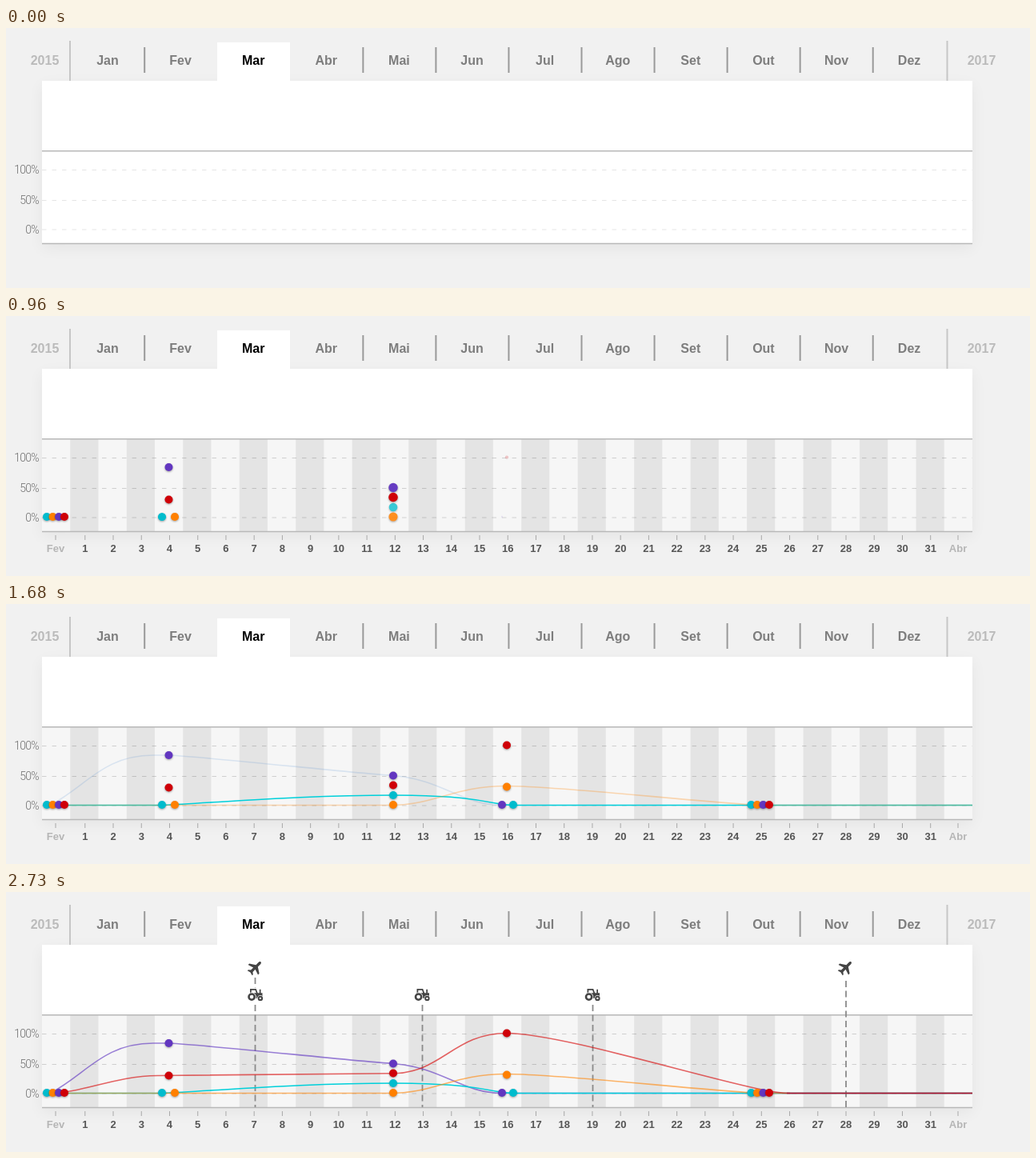
An HTML page that plays this animation: 1280x325 px, repeating every 2850 ms.

```html
<!DOCTYPE html>
<html lang="pt">
<head>
<meta charset="utf-8">
<title>Março</title>
<style>
@property --t { syntax: "<number>"; inherits: true; initial-value: 0; }
@keyframes clock { from { --t: 0; } to { --t: 2850; } }

html, body { margin: 0; width: 100%; height: 100%; overflow: hidden; background: #f1f1f1; }
body { position: relative; }
.shadow {
  position: absolute; left: 45px; top: 66px; width: 1163px; height: 203px;
  box-shadow: 0 6px 18px rgba(0, 0, 0, .055);
}
svg {
  position: absolute; left: 0; top: 0; width: 1280px; height: 325px;
  animation: clock 2850ms steps(95) infinite;
}
text { font: bold 16px "Liberation Sans", Arial, sans-serif; text-anchor: middle; fill: #7d7d7d; }
.pale { fill: #bbb; }
.now { fill: #000; }
.pct text { font: 300 14px Roboto, sans-serif; letter-spacing: -.7px; text-anchor: end; fill: #707070; }
.days text { font-size: 13px; fill: #555; }
.days text.pale { fill: #b5b5b5; }
.days line { stroke: #a8a8a8; }

/* --p runs 0..1 from --s over --d milliseconds */
.step { --p: clamp(0, (var(--t) - var(--s)) / var(--d), 1); }
.fade { opacity: var(--p); }
.intro { --s: 0; --d: 350; }
.guide { stroke: #000; stroke-dasharray: 5.5 7; stroke-opacity: calc(.1 + .06 * var(--p)); }

.dot {
  --d: 330;
  --q: (var(--p) - 1);
  opacity: clamp(0, (var(--t) - var(--s)) / 150, 1);
  transform: scale(calc(1 + 3.3 * var(--q) * var(--q) * var(--q) + 2.3 * var(--q) * var(--q)));
  transform-box: fill-box; transform-origin: center;
  filter: drop-shadow(0 1px 1px rgba(0, 0, 0, .35));
}
.curve { --d: 240; fill: none; stroke-width: 1.6; }
.tint { stroke: color-mix(in srgb, #5f36c2 calc(100% * var(--p)), #2b93cf); }
.icons { --s: 2040; --d: 360; fill: #444; opacity: calc(1 - (1 - var(--p)) * (1 - var(--p))); }
.wipe { --s: 2370; --d: 360; height: calc(165px * var(--p)); }
.drop { stroke: #8a8a8a; stroke-width: 1.8; stroke-dasharray: 8 4.5; }
</style>
</head>
<body>
<div class="shadow"></div>
<svg viewBox="0 0 1280 325">
  <defs>
    <clipPath id="wipe"><rect class="step wipe" y="104" width="1280"/></clipPath>
    <path id="plane" transform="rotate(45)" d="M0-10C1.2-10 1.7-8.5 1.7-7V-3L8.8 1.6V3.8L1.7 1.6V6L4.2 8V9.6L0 8.5L-4.2 9.6V8L-1.7 6V1.6L-8.8 3.8V1.6L-1.7-3V-7C-1.7-8.5-1.2-10 0-10Z"/>
    <g id="tractor">
      <path fill-rule="evenodd" d="M-6.5-7.5H1.2L3.2-2.2H5.3V-6.8H7V-2.2H9V2.2H3.5V4.2H-7.5V-2H-6.5ZM-4.7-5.8V-2.2H1.3L0-5.8Z"/>
      <g fill="#fff" stroke="#fff">
        <circle cx="-4.4" cy="2.6" r="5.2"/>
        <circle cx="6.4" cy="4.4" r="3.4"/>
      </g>
      <g fill="none" stroke="#444">
        <circle cx="-4.4" cy="2.6" r="3.6" stroke-width="2.6"/>
        <circle cx="6.4" cy="4.4" r="2.2" stroke-width="2"/>
      </g>
    </g>
  </defs>

  <path fill="#fff" d="M45 66H264V18H355V66H1208V269H45Z"/>
  <g id="months"></g>
  <g id="columns" class="step intro fade"></g>
  <g class="step intro">
    <path class="guide" d="M45 177.5H1208M45 215.5H1208M45 252H1208"/>
  </g>
  <path stroke="#b8b8b8" stroke-width="1.4" d="M45 153.8H1208M45 269.5H1208"/>
  <g class="pct">
    <text x="41" y="181.5">100%</text>
    <text x="41" y="220">50%</text>
    <text x="41" y="256.5">0%</text>
  </g>
  <g id="days" class="days step intro fade"></g>

  <g class="drop" clip-path="url(#wipe)">
    <path d="M311.5 107V120M311.5 141V269M520.5 141V269M733.5 141V269M1050 111V269"/>
  </g>

  <g class="step fade curve" style="--s:1620">
    <path class="tint" opacity=".62" d="M56 251C100 228 122 189 184 189H204C260 192 430 211 484 214.5C545 219 570 251.5 620 251.5H1208"/>
  </g>
  <g class="step fade curve" style="--s:1440">
    <path stroke="#00d0da" d="M51 251.5H195C270 248 370 239 484 239C560 239 592 245 612 249Q624 251.5 634 251.5H1208"/>
  </g>
  <g class="step fade curve" style="--s:1560">
    <path stroke="#ff8a10" opacity=".62" d="M58 251.5H484C540 250 560 227.5 626 227.5C690 227.5 850 246 939 251.5H1208"/>
  </g>
  <g class="step fade curve" style="--s:1680">
    <path stroke="#d80000" opacity=".6" d="M62 251.5C100 249 140 229.5 190 229.5L484 226.8C545 226 560 176.5 626 176.5C690 176.5 870 232 945 247Q965 251.5 980 251.5"/>
    <path stroke="#b01030" d="M976 251.5H1208"/>
  </g>

  <g id="dots"></g>

  <g class="step icons">
    <use href="#plane" x="0" transform="translate(311.5 94.5)"/>
    <use href="#plane" transform="translate(1049.5 94.5)"/>
    <use href="#tractor" transform="translate(311.5 128.5)"/>
    <use href="#tractor" transform="translate(520 128.5)"/>
    <use href="#tractor" transform="translate(733 128.5)"/>
  </g>
</svg>
<script>
const add = (id, tag, attrs, text = "") => {
  const el = document.createElementNS("http://www.w3.org/2000/svg", tag);
  for (const k in attrs) el.setAttribute(k, attrs[k]);
  el.textContent = text;
  document.getElementById(id).append(el);
};
const label = (id, x, y, text, cls = "") => add(id, "text", { x, y, class: cls }, text);
const rule = (id, x, y1, y2, attrs = {}) => add(id, "line", { x1: x, x2: x, y1, y2, ...attrs });

// Month bar
const names = "Jan Fev Mar Abr Mai Jun Jul Ago Set Out Nov Dez".split(" ");
names.forEach((name, i) => {
  label("months", 127 + 91.1 * i, 45.5, name, i === 2 ? "now" : "");
  if (i < 11 && i !== 1 && i !== 2)
    rule("months", 173.2 + 91.05 * i, 24, 56, { stroke: "#999", "stroke-width": 2 });
});
[[48.5, 80, 2015], [1219.5, 1176.5, 2017]].forEach(([x, edge, year]) => {
  label("months", x, 45.5, year, "pale");
  rule("months", edge, 16, 66, { stroke: "#c6c6c6", "stroke-width": 2 });
});

// Day columns, ticks and labels
const width = 1163 / 33;
for (let i = 0; i < 33; i++) {
  const end = i === 0 ? "Fev" : i === 32 ? "Abr" : "";
  const x = i === 0 ? 62 : i === 32 ? 1190 : 98.8 + 35.23 * (i - 1);
  add("columns", "rect", {
    x: 45 + width * i, y: 154, width, height: 115, "fill-opacity": i % 2 ? .105 : .036
  });
  rule("days", x, 274, 280);
  label("days", x, 295, end || i, end && "pale");
}

// Each group: start time, then x,y for cyan, orange, purple, red
const colors = ["#00bccd", "#ff8000", "#6236c0", "#cf0008"];
const groups = [
  [490, 51, 251, 58.5, 251, 66, 251, 73, 251],
  [620, 195, 251, 211, 251, 203.5, 189, 203.5, 229.5],
  [800, 484, 239, 484, 251, 484, 214.5, 484, 226.5],
  [930, 634, 251, 626, 228.5, 620, 251, 626, 176.5],
  [1135, 931.5, 251, 939, 251, 946.5, 251, 954, 251]
];
for (const [start, ...at] of groups)
  colors.forEach((fill, i) => add("dots", "circle", {
    class: "step dot", cx: at[2 * i], cy: at[2 * i + 1], r: 5, fill,
    style: `--s:${start + 15 * (3 - i)}`
  }));
</script>
</body>
</html>
```
